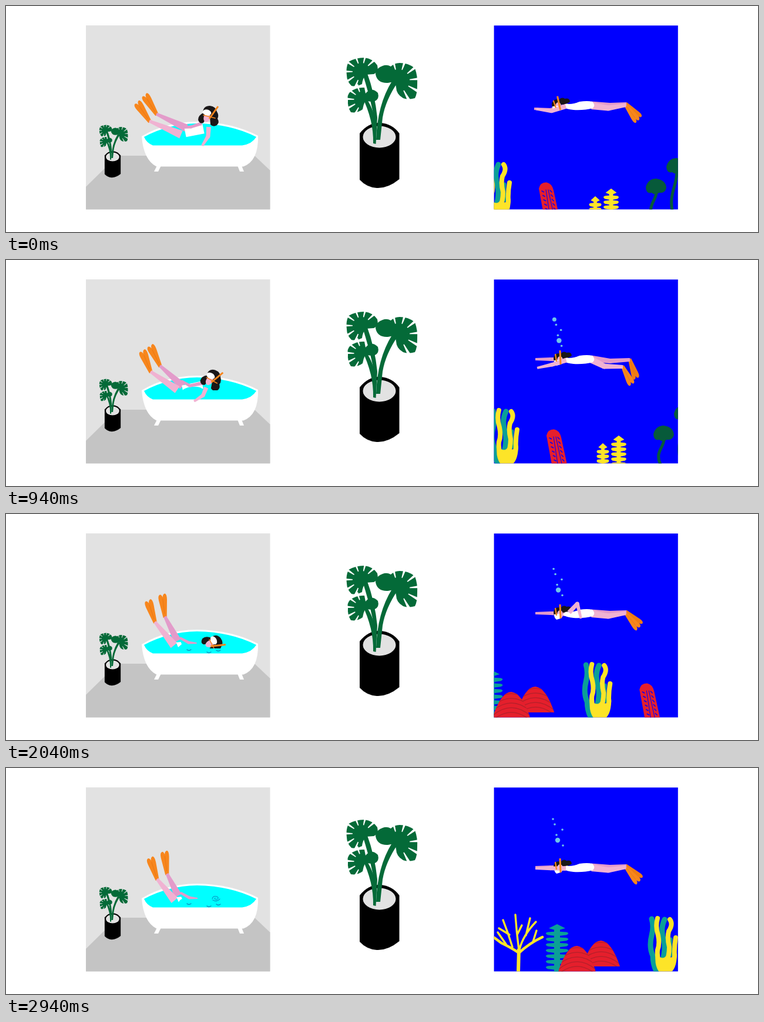
Recreate the animation shown at these times as an HTML page with a canvas. Size 1280 by 385 pixels, loop 2960 ms.

```html
<!DOCTYPE html>
<html lang="en">
<head>
<meta charset="utf-8">
<title>Bathtub diver</title>
<style>
html, body { margin: 0; width: 100%; height: 100%; overflow: hidden; background: #fff; }
canvas { display: block; }
</style>
</head>
<body>
<canvas id="stage" width="1280" height="385"></canvas>
<script>
const c = document.getElementById('stage').getContext('2d');
const LOOP = 2960, RAD = Math.PI / 180;
const GREEN = '#046a38', DEEP = '#075a3a', ORANGE = '#f7861d', BLACK = '#1a1718';
const SKIN = '#f0b2d2', SHADE = '#e39bca', WATER = '#00ffff';
const YELLOW = '#fde428', TEAL = '#0b9f97', RED = '#e51f2c', BLUE = '#0000fe';

const clamp = x => Math.max(0, Math.min(1, x));
const ease = x => (1 - Math.cos(Math.PI * clamp(x))) / 2;
const mix = (a, b, u) => a + (b - a) * u;
const mixPoint = (a, b, u) => a.map((v, i) => mix(v, b[i], u));
const polar = (p, deg, len) => [p[0] + len * Math.cos(deg * RAD), p[1] + len * Math.sin(deg * RAD)];

function fill(path, color) {
  c.fillStyle = color;
  c.fill(new Path2D(path));
}
function line(path, color, width, cap = 'round') {
  c.strokeStyle = color;
  c.lineWidth = width;
  c.lineCap = cap;
  c.lineJoin = 'round';
  c.stroke(new Path2D(path));
}
function oval(x, y, rx, ry, color, turn = 0) {
  c.fillStyle = color;
  c.beginPath();
  c.ellipse(x, y, rx, ry, turn * RAD, 0, 7);
  c.fill();
}
function at(x, y, draw, turn = 0, size = 1) {
  c.save();
  c.translate(x, y);
  c.rotate(turn * RAD);
  c.scale(size, size);
  draw();
  c.restore();
}
// Tapered bar from a to b
function limb(a, b, wa, wb, color) {
  const len = Math.hypot(b[0] - a[0], b[1] - a[1]) || 1;
  const nx = (a[1] - b[1]) / len / 2, ny = (b[0] - a[0]) / len / 2;
  fill(`M${a[0] + nx * wa} ${a[1] + ny * wa}L${b[0] + nx * wb} ${b[1] + ny * wb}` +
    `L${b[0] - nx * wb} ${b[1] - ny * wb}L${a[0] - nx * wa} ${a[1] - ny * wa}Z`, color);
}
function jointed(a, b, d, wa, wb, wd, color) {
  limb(a, b, wa, wb, color);
  limb(b, d, wb, wd, color);
  oval(b[0], b[1], wb / 2, wb / 2, color);
}
function flipper(p, turn, size = 1, color = ORANGE) {
  at(p[0], p[1], () => {
    fill('M-2-3L28-7Q37-8 38-4Q38-1 33 0Q39 1 39 5Q37 8 28 7L-2 3Z', color);
    line('M5 0L30 0', '#e5730f', 0.7);
  }, turn, size);
}

// Leaf outline with a fan of cuts around its middle
function leaf(path, x, y, r, from, to, cuts, bg) {
  fill(path, GREEN);
  for (let i = 0; i < cuts; i++) {
    const a = mix(from, to, i / (cuts - 1));
    limb(polar([x, y], a, r * 1.12), polar([x, y], a, r * 0.58), r * 0.15, 1.5, bg);
  }
}
function plant(bg) {
  fill('M602 217Q616 199 636 199Q657 200 669.5 217V295Q650 311 631 310Q614 309 602 296Z', '#000');
  oval(635.5, 223, 28, 18.5, '#e2e2e2');
  fill('M606 112L614 112Q628 150 632 190L629.5 235L625 234Q628 200 624 178Q618 150 606 112Z', GREEN);
  fill('M606 154L613 157Q629 180 630 210L629 234L625 234Q626 195 606 154Z', GREEN);
  fill('M657 128L668 128Q646 160 641 190L637 228L630 228Q632 168 657 128Z', GREEN);
  leaf('M629 116Q629 106 641 102Q648 99 655 103Q661 97 670 97Q685 97 696 106Q701 120 700 134Q700 150 696 157Q684 160 676 157Q664 150 664 138Q662 132 664 128Q656 130 650 131Q632 132 629 116Z',
    668, 127, 33, -105, 62, 6, bg);
  leaf('M583 95Q595 88 610 88Q625 90 632 101Q635 112 626 116L612 117Q607 124 606 133Q597 138 588 136Q580 128 580 118Q578 106 583 95Z',
    605, 112, 26, 112, 318, 7, bg);
  leaf('M586 146Q597 138 610 139L612 149Q622 137 633 148Q636 158 628 162Q618 164 612 161Q608 168 607 176Q598 183 587 181Q581 172 582 160Q580 152 586 146Z',
    607, 160, 25, 118, 250, 5, bg);
}

function bathHead() {
  fill('M-9-5Q-8-16 3-16Q13-15 15-6Q19 0 16 6Q20 12 15 17Q9 21 4 16L3 3L-7 3Z', BLACK);
  fill('M-8-4Q-17 0-17 8Q-14 16-8 13Q-4 8-5-1Z', BLACK);
  oval(-2, 4, 5.5, 8, SKIN, 15);
  oval(-2, -4.5, 7.5, 5, '#fff', 12);
  line('M-8 0L12 5', ORANGE, 1.5);
  line('M2 6L17-15', ORANGE, 3, 'butt');
}

function bather(t, dip) {
  const plunge = ease((t - 1300) / 440), sunk = Math.max(0, t - 420) / 1000;
  const blend = (a, b, d) => mix(mix(a, b, dip), d, plunge);
  // lounging, dipped and plunged positions, then a slow slide into the water
  const pose = (a, b, d, slide = 1) => a.map((v, i) => blend(v, b[i], d[i]) + [4, 6][i] * sunk * slide);

  const nearFoot = pose([244, 196], [244, 187], [247, 174]);
  const farFoot = pose([256, 184], [260, 177], [264, 165]);
  flipper(farFoot, blend(-122, -116, -97));
  flipper(nearFoot, blend(-124, -112, -108));
  limb(farFoot, pose([307, 208], [300, 214], [290, 213], 0.3), 5, 13, SHADE);
  limb(nearFoot, pose([298, 219], [291, 220], [284, 221], 0.3), 5, 14, SKIN);

  limb(pose([305, 215], [300, 219], [290, 221], 0.2), pose([336, 209], [334, 212], [297, 218], 0.2),
    blend(17, 12, 9), blend(17, 13, 4), '#fff');
  const [x, y] = pose([318, 228], [317, 222], [312, 226], 0);
  oval(x, y, 17 * dip, 6 * dip, WATER, -6);
  jointed(pose([333, 200], [336, 208], [322, 216], 0.4), pose([315, 206], [312, 213], [308, 215], 0.4),
    pose([301, 207], [298, 205], [294, 208], 0.3), blend(6, 6, 2), 5, 4, SHADE);

  const arm = blend(8, 7.5, 0);
  jointed(pose([345, 206], [340, 216], [334, 226], 0.4), pose([344, 222], [335, 230], [330, 228], 0.2),
    pose([334, 238], [321, 242], [328, 229], -0.4), arm, arm * 0.85, arm * 0.5, SKIN);

  c.save();
  c.beginPath();
  c.rect(300, 130, 100, blend(100, 92, 99));
  c.clip();
  const [hx, hy] = pose([344, 186], [347, 199], [345, 210]);
  at(hx, hy, bathHead, 10 * dip + 24 * plunge + 9 * sunk, 1 - ease((t - 2050) / 800));
  c.restore();

  c.globalAlpha = clamp((t - 1050) / 250);
  for (const [x, y] of [[311, 231], [345, 235], [361, 232]])
    line(`M${x - 3} ${y}q3 3 7 0`, '#088fc0', 1.3);
  c.globalAlpha = clamp((t - 2550) / 250);
  line('M351 223Q352 217 359 219Q364 222 358 224Q354 224 356 221M352 225Q359 229 364 223', '#088fc0', 1.1);
  c.globalAlpha = 1;
}

function bathroom(t, dip) {
  c.fillStyle = '#e2e2e2';
  c.fillRect(136, 33, 313.5, 313.5);
  fill('M136 308L190 255H423L449.5 280V346.5H136Z', '#c4c4c4');
  at(-75.3, 166.9, () => plant('#e2e2e2'), 0, 0.404);
  fill('M257 272H264L259 282H252ZM394 272H401L405 282H398Z', '#fff');
  fill('M231 222Q270 198 325 197Q385 198 429 221Q430 264 404 273.5H256Q234 262 231 222Z', '#fff');
  fill('M235 223Q275 201 325 200Q383 201 426 223Q419 235 402 237.5H250Q239 233 235 223Z', WATER);
  bather(t, dip);
}

function fern(x, top, half, color) {
  const step = half * 0.18 + 6;
  line(`M${x} ${top + 5}V350`, color, half * 0.5, 'butt');
  fill(`M${x} ${top}L${x + half * 0.7} ${top + 7}L${x} ${top + 11}L${x - half * 0.7} ${top + 7}Z`, color);
  for (let y = top + 7 + step; y < 350; y += step)
    for (const s of [-half, half])
      fill(`M${x} ${y - 4}L${x + s * 0.8} ${y - 3}Q${x + s * 1.12} ${y - 1} ${x + s * 0.8} ${y + 2}L${x} ${y + 4}Z`, color);
}

function weed() {
  line('M904 257Q908 270 904 285Q899 305 906 320Q906 335 912 346M926 258Q918 275 925 295Q928 310 922 330', TEAL, 9);
  line('M936 292Q934 305 937 318', TEAL, 7);
  line('M914 256Q910 270 915 285Q918 300 914 310Q912 330 925 342M935 258Q941 266 933 278Q930 290 934 305Q934 320 928 335M945 289Q942 305 943 320Q940 340 925 342', YELLOW, 8);
  fill('M911 316Q923 330 930 318Q937 328 947 316Q947 340 937 348H917Q908 336 911 316Z', YELLOW);
}

function cactus() {
  fill('M995 299Q997 288 1008 288.5Q1017 290 1020 302L1030 348H1004Z', RED);
  line('M1007 301L1014 347M1011 301L1021 347', BLUE, 1.1);
  for (let y = 303, x = 1000; y < 346; y += 7.5, x += 1.6)
    line(`M${x} ${y}l3.5 2M${x + 14} ${y - 1}l3 3`, BLUE, 1.5);
}

function shell(x, base) {
  at(x, base, () => {
    const dome = 'M-32 0Q-18-44 0-44Q18-42 32 0Z';
    fill(dome, RED);
    c.clip(new Path2D(dome));
    for (let y = 6; y > -34; y -= 8)
      line(`M-34 ${y}Q0 ${y - 30} 34 ${y}`, '#b9202b', 1.6);
  });
}

function mushroom(x, y) {
  const h = 350 - y;
  line(`M${x} ${y}C${x} ${y + h * 0.35} ${x - 18} ${y + h * 0.5} ${x - 4} 352`, DEEP, 5);
  at(x, y, () => fill('M-18-8Q-15-22-1-23Q16-21 17-7Q14 3 5 1Q-3 6-8 1Q-17 4-18-8Z', DEEP));
}

function tree() {
  line('M872 348L873 308', YELLOW, 6, 'butt');
  line('M873 315Q860 306 843 298L831 289M873 315Q890 299 913 288', YELLOW, 4.5);
  line('M873 310Q869 280 867 250M874 309Q880 285 902 262M862 305Q855 282 846 259M851 300L837 280M870 284L878 268M885 285L892 256M897 296L903 277M857 284L839 273', YELLOW, 3.4);
}

function seabed(t, dip, pull, recover) {
  const place = (ref, draw) => at(140 * pull + 143 * recover - ref, 12 * (1 - dip), draw);
  place(0, () => {
    mushroom(1107, 305);
    mushroom(1142, 270);
  });
  place(88, () => {
    const duck = 38 * Math.sin(Math.PI * clamp(t / 840));
    fern(1091, 312 + duck, 11, YELLOW);
    fern(1118, 299, 13.5, YELLOW);
    cactus();
    weed();
  });
  place(236, () => {
    fern(891, 266, 20, TEAL);
    shell(966, 338);
    shell(925, 347);
  });
  place(283, tree);
}

function bubbles(t) {
  const up = 18 * clamp((t - 420) / 2520), grow = ease((t - 100) / 250);
  [945, 942, 940, 944, 937, 934].forEach((x, i) => {
    const r = grow * (i === 1 ? 4.2 : i === 5 ? mix(3.5, 1.8, ease((t - 1400) / 200)) : 1.8);
    oval(x + Math.sign(x - 943) * up / 6, 150 - 9 * i - up, r, r, '#6fc5ea');
  });
}

function swimmer(t, dip, pull, recover) {
  const kick = ease((t - 500) / 400) - ease((t - 1350) / 380);
  const tilt = 1 - dip;
  const farFoot = mixPoint([1056, 167], [1062, 170], kick);
  const nearFoot = mixPoint([1055, 169], [1050, 182], kick);
  const knee = mixPoint([1025, 174], [1018, 181], kick);
  flipper(farFoot, mix(41, 71, kick) + 5 * tilt, 0.88, '#f07c12');
  flipper(nearFoot, mix(51, 63, kick) + 3 * tilt, 0.88);
  jointed([996, 168], [1028, mix(169, 172, kick)], farFoot, 11, 8, 6, SHADE);
  jointed([997, 170], knee, nearFoot, 12, 9, 6, SKIN);
  jointed([954, 170], [927, 169 + 8 * tilt], [901 - 2 * tilt, 169 + 6 * tilt], 8, 6, 4, SHADE);

  at(940 - 3 * tilt, 168, () => {
    oval(0, 0, 8, 9, BLACK);
    fill('M3-7Q9-14 14-10Q22-12 23-5Q17 0 7 0Z', BLACK);
    oval(3, 3, 5, 7, SKIN);
    fill('M-7 3L2 2L4 10L-3 12Q-7 9-7 3Z', '#fff');
  });
  fill('M948 172Q951 165 958 167Q967 167 976 163Q990 161 998 163Q1004 169 999 174Q984 178 966 177Q954 176 948 172Z', '#fff');

  // One arm stroke: pull down to the hip, then swing back over the head
  const swing = pull * (1 - recover);
  const shoulder = [953 + 7 * swing, 171 - 4 * swing];
  const elbow = polar(shoulder, 180 - 190 * pull - 170 * recover - 18 * tilt, 26 - 7 * swing);
  const hand = polar(elbow, 180 - 133 * pull + 133 * recover + 8 * tilt, 26);
  jointed(shoulder, elbow, hand, 8, 6.5, 4, SKIN);

  at(940 - 2 * tilt, 168, () => {
    line('M3-14L4 10', ORANGE, 3, 'butt');
    line('M-5-8L-3 5', ORANGE, 2.2, 'butt');
  }, -10 * tilt);
}

function ocean(t, dip) {
  const pull = ease((t - 757) / 930), recover = ease((t - 1752) / 930);
  c.save();
  c.beginPath();
  c.rect(830.6, 33.2, 313.2, 313.3);
  c.clip();
  c.fillStyle = BLUE;
  c.fillRect(830, 33, 314, 314);
  seabed(t, dip, pull, recover);
  bubbles(t);
  swimmer(t, dip, pull, recover);
  c.restore();
}

let start;
function frame(now) {
  start ??= now;
  const t = (now - start) % LOOP;
  const dip = 1 - (1 - clamp(t / 420)) ** 2;
  c.fillStyle = '#fff';
  c.fillRect(0, 0, 1280, 385);
  bathroom(t, dip);
  plant('#fff');
  ocean(t, dip);
  requestAnimationFrame(frame);
}
requestAnimationFrame(frame);
</script>
</body>
</html>
```
